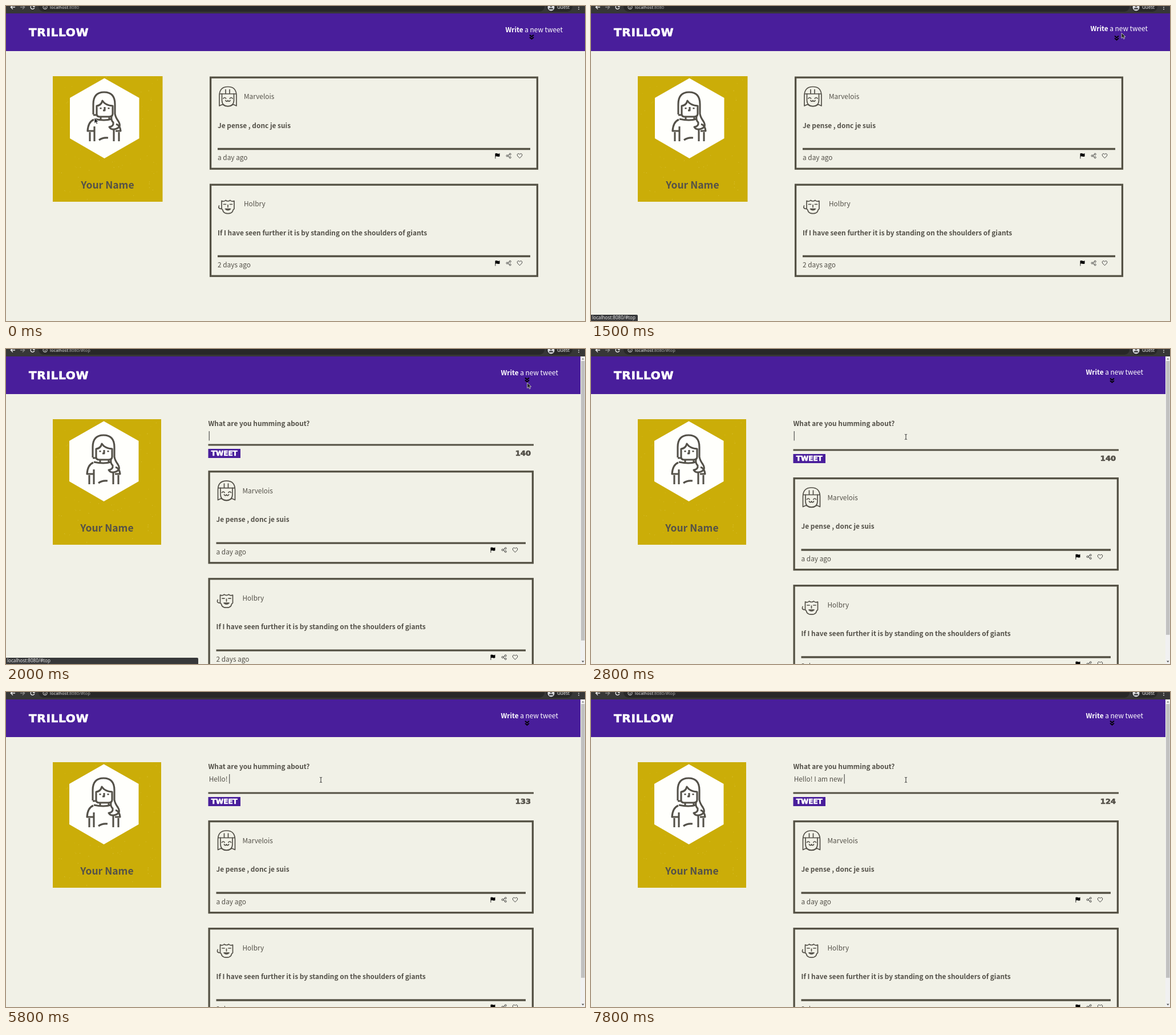
Recreate the animation shown at these times as an HTML page. Size 1015 by 552 pixels, loop 8000 ms.

```html
<!DOCTYPE html>
<html lang="en">
<head>
<meta charset="utf-8">
<title>Short message page</title>
<style>
html, body { margin: 0; width: 100%; height: 100%; overflow: hidden; background: #f1f1e7; }
svg { display: block; width: 1015px; height: 552px; }
text { font: 300 11.85px "Noto Sans CJK JP", "Noto Sans CJK SC", "Noto Sans CJK", "Noto Sans", sans-serif; fill: #545149; white-space: pre; }
.bold { font-weight: 700; }
.block { font: 700 12px "DejaVu Sans", sans-serif; stroke-width: .7; }
.ui { font: 400 7.55px "Noto Sans", sans-serif; fill: #e8e8e8; }
.white { fill: #fff; stroke: #fff; }
.line { fill: none; stroke: #545149; stroke-linecap: round; stroke-linejoin: round; }
</style>
</head>
<body>
<svg viewBox="0 0 1015 552">
  <defs><clipPath id="formClip"><rect id="clipBox" x="340" y="118" width="600" height="0"/></clipPath></defs>
  <rect width="1015" height="552" fill="#f1f1e7"/>
  <g id="page"></g>
  <g id="scrollbar">
    <rect x="1007" y="12" width="8" height="540" fill="#f1f1f1"/>
    <rect id="thumb" x="1008" y="21" width="6.5" fill="#c1c1c1"/>
    <path d="M1009 18.5h4.6l-2.3-2.8z" fill="#858585"/><path d="M1009 546.5h4.6l-2.3 2.8z" fill="#505050"/>
  </g>
  <g id="browser">
    <rect width="1015" height="13" fill="#373737"/>
    <rect x="57" y="-10" width="887" height="20" rx="9" fill="#282828"/>
    <rect x="947" y="-10" width="46" height="20" rx="9" fill="#282828"/>
    <g fill="none" stroke="#eee" stroke-width="1.3">
      <path d="M16 2H8.5M12 -1.5L8.3 2L12 5.5"/>
      <path d="M25 2h7.5M29 -1.5L32.7 2L29 5.5" stroke="#888"/>
      <path d="M49.8 3a3.4 3.4 0 1 1-.6-3.2M50 -2v3h-3"/>
      <path d="M68.5 1.6v2.8M68.5 -.6v1" stroke-width="1"/><circle cx="68.5" cy="2" r="3.6" stroke-width=".9"/>
    </g>
    <circle cx="955.5" cy="2.5" r="6" fill="#dadce0"/>
    <circle cx="955.5" cy="0" r="2" fill="#4a4b4d"/><path d="M951.5 6a4 3 0 0 1 8 0z" fill="#4a4b4d"/>
    <text class="ui" x="966" y="5" style="font-size:8px;font-weight:500">Guest</text>
    <g fill="#eee"><circle cx="1004" cy="-1" r=".9"/><circle cx="1004" cy="2.3" r=".9"/><circle cx="1004" cy="5.6" r=".9"/></g>
    <text class="ui" x="77" y="5">localhost<tspan id="urlTail" fill="#aaa"></tspan></text>
  </g>
  <g id="status">
    <path id="bubble" fill="#37383a"/>
    <text class="ui" x="2" y="549.3" style="font-size:8.1px">localhost:8080/#top</text>
  </g>
  <g id="pointer">
    <path id="arrow" d="M0 0v9.5l2.3-2 1.5 3.4 1.7-.8-1.5-3.2h3z" fill="#222" stroke="#ddd" stroke-width=".8"/>
    <path id="beam" d="M-2 -4.5q2 0 2 1.2q0-1.2 2-1.2M0 -3.5v7M-2 4.5q2 0 2-1.2q0 1.2 2 1.2" fill="none" stroke="#333" stroke-width="1"/>
  </g>
</svg>
<script>
const $ = id => document.getElementById(id);
const LOOP = 8000, CLICK = 1690, FORM_HEIGHT = 101.5;
const MESSAGE = "Hello! I am new ";
const KEYS = [3200, 3700, 4000, 4100, 4250, 5600, 5700, 6200, 6300, 6500, 6700, 6900, 7100, 7300, 7500, 7700];
const PATH = [[300, 155, 196], [600, 400, 278], [1000, 900, 29], [1200, 932, 41], [1500, 930, 47],
  [2000, 914, 59], [2100, 890, 72], [2500, 552, 154]];
const clamp = x => Math.max(0, Math.min(1, x));
const show = (id, on) => $(id).setAttribute("visibility", on ? "visible" : "hidden");
const move = (id, x, y) => $(id).setAttribute("transform", `translate(${x} ${y})`);

const bobHead = `<path d="M-15 16.5V-1Q-15-17 0-17T15-1V16.5L9.5 14Q0 21-9.5 14ZM-10.5-5V7Q-10 17 0 17T10.5 7V-5M-14.5-4.5H14.5M-4-5V-12M3-5V-12"/>
  <path d="M-8 3.5q2.3-3 4.6 0M3.4 3.5q2.3-3 4.6 0M-4 7q2 3.5 4 0q2 3.5 4 0"/>`;
const curlyHead = `<path d="M-11 9Q-18 9-15.5 3.5Q-18.500-14.500-3Q-18-8-12.500-10Q-12-16-6.500-14Q-3-19 1-15.500Q6-18.500 8.500-13.500Q15-14 13.500-8Q18-6 15-1Q18 3 15 5Q16.500 9 11 9"/>
  <path d="M-11-5V9Q-9 10-8 14Q-5 17.500 0 17Q5 17.500 8 14Q9 10 11 9V-5Q7-3 4-6Q0-3-4-6Q-7-3-11-5"/>
  <path d="M-7.500 1h4M3.500 1h4M0 2v4M-4.500 9q4.500 4 9 0z"/>`;
const portrait = `<path d="M153 190V172Q153 151 172 151T191 172V189Q192 195 197 202Q204 213 190 216Q184 217 181 212Q189 211 188 204Q184 201 185 193"/>
  <path d="M153 191H159V175Q167 174 169 166Q174 174 187 175V189Q187 194 180 194H164Q159 194 159 189M166 195V199M181 195V199"/>
  <path d="M166 178v2.500M180 178v2.500M173 177v6h-3M155 198Q173 202 185 198"/>
  <path d="M154 199Q144 203 143 219H154M147 221V237M155 211V237M189 216V237M193 207Q200 209 201 219H192M198 221V237M163 235Q169 230 179 231"/>`;

function specks(width) {
  let seed = 7, out = "";
  const random = () => (seed = seed * 16807 % 2147483647) / 2147483647;
  for (let i = 0; i < 110; i++)
    out += `<circle cx="${83 + random() * (width - 2)}" cy="${124 + random() * 218}" r="${.3 + random() * .4}"/>`;
  return `<g fill="#e5cf58" opacity=".55">${out}</g>`;
}

function card(top, left, right, head, name, quote, age) {
  return `<g transform="translate(0 ${top})">
    <rect x="${left + 1.6}" y="1.700" width="${right - left - 3.2}" height="160" fill="none" stroke="#545144" stroke-width="3.300"/>
    <g class="line" stroke-width="1.700" transform="translate(${left + 32} 35)">${head}</g>
    <text x="${left + 60}" y="39.500">${name}</text>
    <text class="bold" x="${left + 14}" y="90">${quote}</text>
    <path d="M${left + 14} 127H${right - 14}" stroke="#545144" stroke-width="3.300"/>
    <text x="${left + 14}" y="146.500">${age}</text>
    <g transform="translate(${right} 139)">
      <path d="M-75.500-4q2-1 4 0t4-.500v5.500q-2 1-4 .200t-3.200.300v3.500h-.800z"/>
      <g fill="none" stroke="#333" stroke-width=".9">
        <circle cx="-54.500" cy="0" r="1.500"/><circle cx="-49.300" cy="-2.800" r="1.500"/><circle cx="-49.300" cy="2.900" r="1.500"/>
        <path d="M-53.200-.700l2.600-1.400M-53.200.700l2.600 1.500M-32.500 4.200l-3.800-3.900q-1.500-2.800.800-4q1.800-.600 3 1.200q1.200-1.800 3-1.200q2.300 1.200.800 4z"/>
      </g>
    </g></g>`;
}

function layout(narrow) {
  const left = narrow ? 354.5 : 357, right = narrow ? 925 : 933;
  const width = narrow ? 190 : 192.5, shift = narrow ? -1 : 0, edge = narrow ? 968 : 976;
  return `<rect y="12" width="1015" height="67" fill="#491e9b"/>
    <text class="block white" x="40" y="53" style="font-size:20px;letter-spacing:.700px">TRILLOW</text>
    <text id="nav" class="white" stroke="none" style="stroke:none" x="${edge}" y="46" text-anchor="end"><tspan class="bold">Write</tspan> a new tweet</text>
    <path id="chevrons" d="M${edge - 58} 50.500l3.500 3 3.500-3M${edge - 58} 54.500l3.500 3 3.500-3" fill="none" stroke="#000" stroke-width="1.900"/>
    <rect x="82" y="123" width="${width}" height="220" fill="#cbad08"/>${specks(width)}
    <g transform="translate(${shift} 0)">
      <path d="M172.500 126.500L233.500 161V232L172.500 267L112 232V161Z" fill="#fffffc"/>
      <g class="line" stroke-width="3.100" style="stroke-linecap:butt">${portrait}</g>
      <text class="bold" x="178" y="319.500" text-anchor="middle" style="font-size:17.500px">Your Name</text>
    </g>
    <g clip-path="url(#formClip)">
      <text class="bold" x="${left}" y="135">What are you humming about?</text>
      <text id="typed" x="${left + 1.2}" y="156.700"></text>
      <rect id="caret" y="144" width="1" height="16.500" fill="#333"/>
      <g id="formFoot">
        <path d="M${left} 177H${right}" stroke="#545144" stroke-width="3.200"/>
        <rect x="${left}" y="184" width="56.500" height="16" fill="#491e9b"/>
        <text class="block white" x="${left + 28.3}" y="196.300" text-anchor="middle">TWEET</text>
        <text id="counter" class="block" stroke="#545149" x="${right - 5}" y="195.800" text-anchor="end" style="font-size:13px"></text>
      </g>
    </g>
    <g id="cards">
      ${card(123.5, left, right, bobHead, "Marvelois", "Je pense , donc je suis", "a day ago")}
      ${card(311.5, left, right, curlyHead, "Holbry", "If I have seen further it is by standing on the shoulders of giants", "2 days ago")}
    </g>`;
}

function pointerAt(t) {
  const next = PATH.findIndex(p => p[0] > t);
  if (next === 0) return PATH[0].slice(1);
  if (next < 0) return PATH[PATH.length - 1].slice(1);
  const [t0, x0, y0] = PATH[next - 1], [t1, x1, y1] = PATH[next];
  const k = (t - t0) / (t1 - t0);
  return [x0 + (x1 - x0) * k, y0 + (y1 - y0) * k];
}

let current = null;
function draw(t) {
  const slide = .5 - .5 * Math.cos(Math.PI * clamp((t - CLICK) / 400));
  const height = FORM_HEIGHT * slide, content = 486 + height, narrow = content > 539;
  if (narrow !== current) $("page").innerHTML = layout(current = narrow);

  const bob = 2 * Math.sin(Math.PI * (t - 120) / 970) ** 2;
  move("nav", 0, -bob);
  move("chevrons", 0, bob);

  $("clipBox").setAttribute("height", slide && height + 5);
  move("formFoot", 0, -Math.min(9, 80 * (1 - slide)));
  move("cards", 0, height);
  show("scrollbar", narrow);
  $("thumb").setAttribute("height", 523 * 539 / content);

  const count = KEYS.filter(k => k <= t).length;
  const typed = $("typed");
  typed.textContent = MESSAGE.slice(0, count);
  $("counter").textContent = 140 - count;
  $("caret").setAttribute("x", +typed.getAttribute("x") + (count ? typed.getComputedTextLength() : 0));
  const lastInput = count ? KEYS[count - 1] : CLICK;
  show("caret", t >= CLICK && (t - lastInput) % 1000 < 500);

  $("urlTail").textContent = t < CLICK ? ":8080" : ":8080/#top";
  const bubble = 82 + 255 * clamp((t - 1700) / 150);
  $("bubble").setAttribute("d", `M0 541H${bubble - 2}q2 0 2 2V552H0z`);
  $("status").setAttribute("opacity", t < 1200 ? 0 : 1 - clamp((t - 2200) / 200));

  const [x, y] = pointerAt(t), overInput = narrow && x < 925 && y > 138;
  move("pointer", x, y);
  show("arrow", !overInput);
  show("beam", overInput);
}

function tick() {
  draw(performance.now() % LOOP);
  requestAnimationFrame(tick);
}
tick();
</script>
</body>
</html>
```
